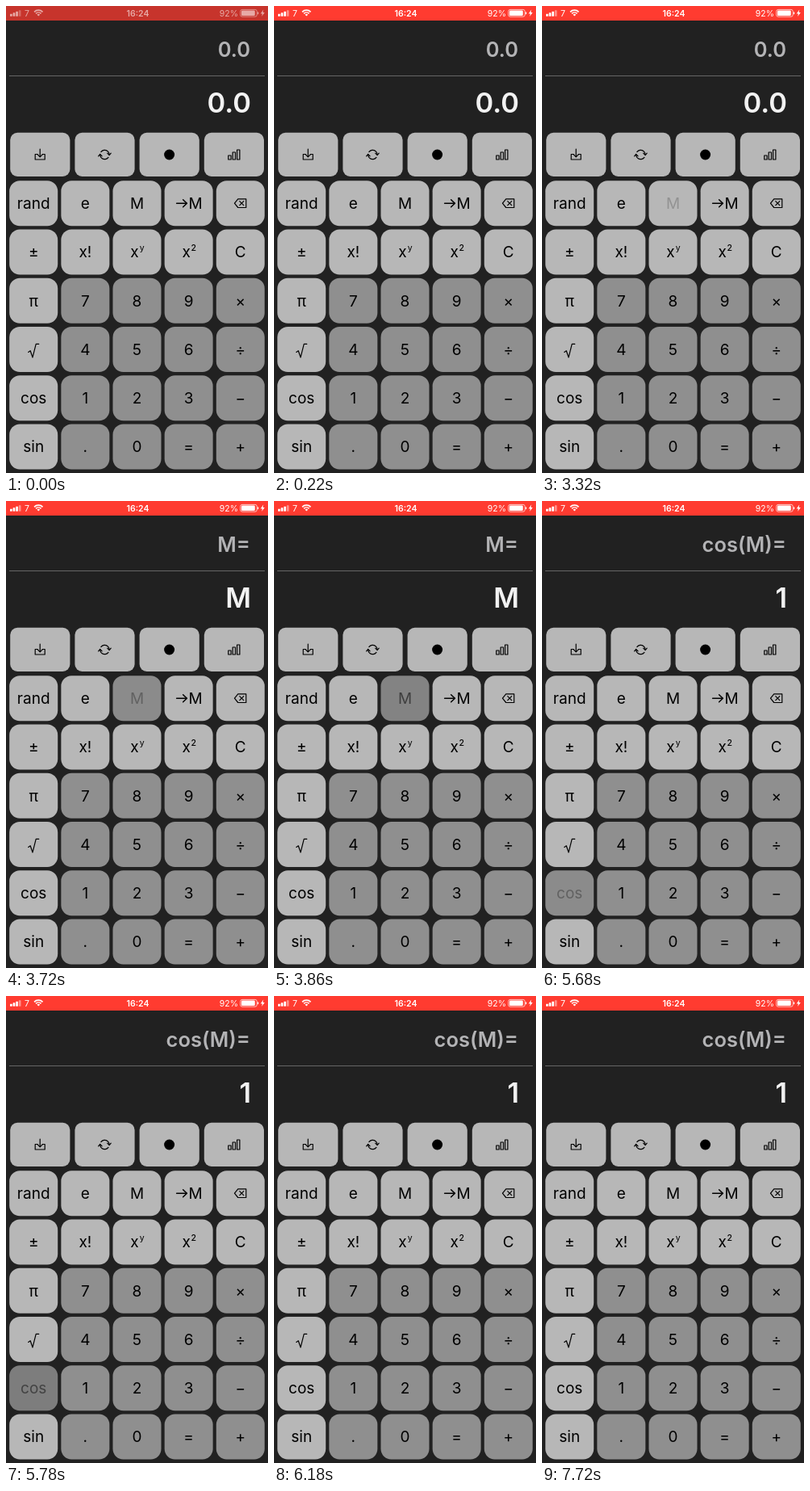
Write an HTML page with a canvas that moves like this. It is 325 by 578 pixels and loops after 8 s.

```html
<!DOCTYPE html>
<html lang="en">
<head>
<meta charset="utf-8">
<title>Calculator</title>
<style>
html, body { margin: 0; width: 100%; height: 100%; overflow: hidden; background: #212121; }
canvas { display: block; width: 325px; height: 578px; }
</style>
</head>
<body>
<canvas id="stage"></canvas>
<script>
const W = 325, H = 578, LOOP = 8000;
const LIGHT = 183, DARK = 143;
const canvas = document.getElementById('stage');
const ctx = canvas.getContext('2d');
const ratio = window.devicePixelRatio || 1;
canvas.width = Math.round(W * ratio);
canvas.height = Math.round(H * ratio);

const keys = [
  ['rand', 'e', 'M', '→M', 'erase'],
  ['±', 'x!', 'x^y', 'x^2', 'C'],
  ['π', '7', '8', '9', '×'],
  ['√', '4', '5', '6', '÷'],
  ['cos', '1', '2', '3', '−'],
  ['sin', '.', '0', '=', '+']
];
const presses = [
  { key: 'M', down: 3320, up: 3680 },
  { key: 'cos', down: 5340, up: 5640 }
];
const flashLevel = [[0, 165], [40, 139], [90, 123], [140, 125], [540, LIGHT]];
const flashLabel = [[0, 0.2], [40, 0.3], [140, 0.47], [540, 1]];

const gray = v => `rgb(${v},${v},${v})`;
const mix = (a, b, k) => a + (b - a) * k;
const clamp = k => Math.max(0, Math.min(1, k));

function along(points, t) {
  for (let i = 1; i < points.length; i++) {
    const [t0, a] = points[i - 1], [t1, b] = points[i];
    if (t <= t1) return mix(a, b, (t - t0) / (t1 - t0));
  }
  return points[points.length - 1][1];
}

function text(str, x, y, size, { weight = 400, align = 'center', color = '#000' } = {}) {
  ctx.font = `${weight} ${size}px Inter, "Open Sans", sans-serif`;
  ctx.textAlign = align;
  ctx.fillStyle = color;
  ctx.fillText(str, x, y);
}

function line(...pts) {
  ctx.beginPath();
  pts.forEach(([x, y], i) => i ? ctx.lineTo(x, y) : ctx.moveTo(x, y));
  ctx.stroke();
}

function box(x, y, w, h, r, fill) {
  ctx.beginPath();
  ctx.roundRect(x, y, w, h, r);
  ctx.fillStyle = fill;
  ctx.fill();
}

function at(x, y, draw) {
  ctx.save();
  ctx.translate(x, y);
  ctx.strokeStyle = ctx.fillStyle = '#000';
  ctx.lineWidth = 1.2;
  ctx.lineJoin = ctx.lineCap = 'round';
  draw();
  ctx.restore();
}

function downloadIcon() {
  line([-3, -0.5], [-6, -0.5], [-6, 6], [6, 6], [6, -0.5], [3, -0.5]);
  line([0, -7], [0, 2.5]);
  line([-3, -0.2], [0, 2.8], [3, -0.2]);
}

function refreshIcon() {
  for (const turn of [0, Math.PI]) {
    ctx.save();
    ctx.rotate(turn);
    ctx.beginPath();
    ctx.arc(0, 0, 5.7, -2.5, -0.1);
    ctx.stroke();
    line([3.3, -1.8], [5.7, 0.7], [7.8, -1.8]);
    ctx.restore();
  }
}

function discIcon() {
  ctx.beginPath();
  ctx.arc(0, 0, 6.5, 0, 7);
  ctx.fill();
}

function chartIcon() {
  [5, 9, 12].forEach((h, i) => ctx.strokeRect(-7 + i * 5.4, 6 - h, 3.3, h));
}

function eraseIcon() {
  line([-7.3, 0], [-3, -5.3], [7, -5.3], [7, 5.3], [-3, 5.3], [-7.3, 0]);
  line([-1, -2.5], [4, 2.5]);
  line([-1, 2.5], [4, -2.5]);
}

function keyLabel(label, x, y) {
  if (label === 'erase') {
    at(x, y, eraseIcon);
  } else if (label === '→M') {
    at(x, y, () => {
      ctx.lineWidth = 1.5;
      line([-15, 0], [-2.5, 0]);
      line([-7, -4.5], [-2.3, 0], [-7, 4.5]);
    });
    text('M', x + 8.5, y + 7, 19);
  } else if (label === '√') {
    at(x, y, () => line([-6.5, 3.5], [-4, 1.8], [-1.2, 10], [3, -6.5], [6.5, -6.5]));
  } else if (label.includes('^')) {
    const [base, power] = label.split('^');
    text(base, x - 3, y + 7, 19);
    text(power, x + 6.2, y - 1, 10.5, { weight: power === '2' ? 500 : 400 });
  } else {
    text(label, x, y + 7, 19);
  }
}

function keyState(label, t) {
  const press = presses.find(p => p.key === label);
  if (!press || t < press.down) return { level: LIGHT, alpha: 1 };
  if (t < press.up) return { level: LIGHT, alpha: 0.2 };
  return { level: along(flashLevel, t - press.up), alpha: along(flashLabel, t - press.up) };
}

function drawKeys(t) {
  [downloadIcon, refreshIcon, discIcon, chartIcon].forEach((icon, i) => {
    const x = 5.2 + i * 80.2;
    box(x, 156.8, 74.2, 54.2, 9, gray(LIGHT));
    at(x + 37, 184, icon);
  });
  keys.forEach((row, r) => row.forEach((label, c) => {
    const x = 4.2 + c * 64.15, y = 216.2 + r * 60.25;
    const { level, alpha } = keyState(label, t);
    box(x, y, 60, 56, 13, gray(r > 1 && c > 0 ? DARK : level));
    ctx.globalAlpha = alpha;
    keyLabel(label, x + 30, y + 28);
    ctx.globalAlpha = 1;
  }));
}

function drawDisplay(t) {
  const [formula, value] = t < presses[0].up ? ['0.0', '0.0']
    : t < presses[1].up ? ['M=', 'M'] : ['cos(M)=', '1'];
  text(formula, 303, 63, 25.5, { weight: 600, align: 'right', color: '#b3b3b5' });
  text(value, 304, 132, 34.5, { weight: 600, align: 'right', color: '#f2f2f2' });
  ctx.fillStyle = '#666';
  ctx.fillRect(4, 86, 317, 1);
}

function drawStatus(t) {
  const lit = clamp((t - 20) / 200);
  ctx.globalAlpha = mix(0.75, 1, lit);
  ctx.fillStyle = '#ff3b30';
  ctx.fillRect(0, 0, W, 18);
  const ink = mix(0.58, 1, lit);
  ctx.globalAlpha = ink;
  const white = { color: '#fff' };
  for (let i = 0; i < 4; i++) {
    ctx.globalAlpha = ink * (i < 3 ? 1 : 0.45);
    const h = 3 + i * 1.5;
    box(5 + i * 3.6, 12.8 - h, 2.7, h, 0.6, '#fff');
  }
  ctx.globalAlpha = ink;
  text('7', 26, 13, 10.5, white);
  text('16:24', 163.5, 13, 10.5, { ...white, weight: 600 });
  text('92%', 288, 13, 10.5, { ...white, align: 'right' });

  at(40.3, 12.6, () => {
    ctx.strokeStyle = ctx.fillStyle = '#fff';
    ctx.lineWidth = 1.7;
    ctx.lineCap = 'butt';
    for (const r of [4.6, 7.4]) {
      ctx.beginPath();
      ctx.arc(0, 0, r, -2.36, -0.78);
      ctx.stroke();
    }
    ctx.beginPath();
    ctx.moveTo(0, 0);
    ctx.arc(0, 0, 2.6, -2.36, -0.78);
    ctx.fill();
  });

  ctx.strokeStyle = '#fff';
  ctx.lineWidth = 0.7;
  ctx.beginPath();
  ctx.roundRect(290.8, 4.4, 20.4, 8.8, 2.2);
  ctx.stroke();
  box(292, 5.6, 16.8, 6.4, 1.2, '#fff');
  box(312, 7.3, 1.2, 3, 0.6, '#fff');
  ctx.beginPath();
  [[319.3, 4.6], [315.8, 9.4], [318, 9.4], [317.2, 13], [320.8, 8], [318.6, 8]]
    .forEach(([x, y]) => ctx.lineTo(x, y));
  ctx.fill();
  ctx.globalAlpha = 1;
}

function frame() {
  const t = performance.now() % LOOP;
  ctx.setTransform(ratio, 0, 0, ratio, 0, 0);
  ctx.fillStyle = '#212121';
  ctx.fillRect(0, 0, W, H);
  drawStatus(t);
  drawDisplay(t);
  drawKeys(t);
  requestAnimationFrame(frame);
}
frame();
</script>
</body>
</html>
```
